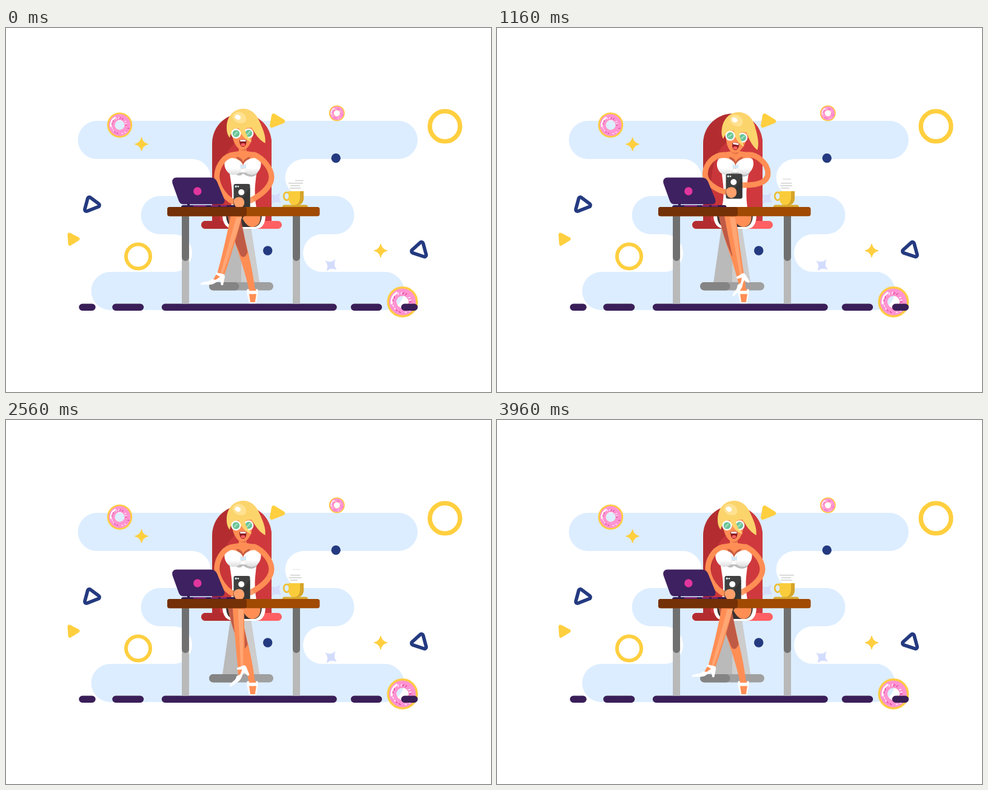
An HTML page that plays this animation: 800 px wide and 600 px high, repeating every 4000 ms.

```html
<!DOCTYPE html>
<html lang="en">
<head>
<meta charset="utf-8">
<title>Selfie at the desk</title>
<style>
html, body { margin: 0; width: 100%; height: 100%; overflow: hidden; background: #fff; }
svg { display: block; width: 100vw; height: 100vh; }
.skin { fill: #ff8e55; }
.arm { fill: none; stroke: #ff8e55; stroke-width: 9; stroke-linecap: round; }
.navy { fill: #243a80; }
.yellow { fill: #ffcf3f; }
.lavender { fill: #d3dcfd; }
.ring { fill: none; stroke: #ffcf3f; }
.round { stroke-linejoin: round; }
.outline { fill: #fff; stroke: #243a80; stroke-width: 11.4; paint-order: stroke; }
.steam line { stroke: #d6d6d6; stroke-width: 1.8; }
</style>
</head>
<body>
<svg viewBox="0 0 800 600">
  <defs>
    <path id="star" d="M0-11Q2-2 11 0Q2 2 0 11Q-2 2-11 0Q-2-2 0-11Z" stroke-width="1" class="round"/>
    <linearGradient id="cup" x2="0" y2="1">
      <stop offset=".6" stop-color="#fff"/><stop offset="1" stop-color="#dcdcdc"/>
    </linearGradient>
  </defs>

  <path fill="#dcedff" d="M150 153H647.500a31.500 31.500 0 0 1 0 63H491a30.500 30.500 0 0 0 0 61H543a31.500 31.500 0 0 1 0 63H521a31 31 0 0 0 0 62H625a31.500 31.500 0 0 1 0 63H172a31.500 31.500 0 0 1 0-63H276a31 31 0 0 0 0-62H254a31.500 31.500 0 0 1 0-63H307a30.500 30.500 0 0 0 0-61H150a31.500 31.500 0 0 1 0-63Z"/>

  <!-- floating ornaments -->
  <circle class="ring" cx="724" cy="162" r="24.900" stroke-width="7.400"/>
  <circle class="ring" cx="218" cy="376.500" r="20" stroke-width="6"/>
  <circle class="navy" cx="544.200" cy="214.500" r="7.700"/>
  <circle class="navy" cx="431.700" cy="367" r="7.700"/>
  <g class="outline round">
    <path d="M137.500 281.800L151.300 292L132.800 299.300Z"/>
    <path d="M685.300 355.800L690.300 374.200L671.700 368Z"/>
  </g>
  <g class="yellow round" stroke="#ffcf3f">
    <path stroke-width="6" d="M104.500 340.500L118.500 347.700L105.500 355.800Z"/>
    <path stroke-width="7" d="M441.500 144.500L456.500 153.800L438.500 160.800Z"/>
  </g>
  <use href="#star" class="yellow" stroke="#ffcf3f" x="223.500" y="191.500"/>
  <use href="#star" class="yellow" stroke="#ffcf3f" x="618" y="367"/>
  <use href="#star" class="lavender" stroke="#d3dcfd" transform="translate(536 391) rotate(38)"/>
  <use href="#star" class="lavender" stroke="#d3dcfd" transform="translate(445 281) rotate(38)"/>
  <g id="donuts"></g>

  <!-- floor -->
  <path stroke="#3a1e58" stroke-width="11.500" stroke-linecap="round" d="M126 460.300H142M181 460.300H221.500M262.500 460.300H540M574.500 460.300H614.500M657.500 460.300H673.500"/>

  <!-- chair -->
  <path fill="#b32d30" d="M340 320V190a49 49 0 0 1 98 0V320Z"/>
  <path fill="#cf393d" d="M389 141a49 49 0 0 1 49 49V320H389Z"/>
  <path fill="#c9363a" d="M389 185C365 190 353 225 353 262V318H389Z"/>
  <path fill="#bababa" d="M370 330H404L418 420H357Z"/>
  <path fill="#cdcdcd" d="M388 330H404L418 420H388Z"/>
  <rect x="335" y="419" width="106" height="13.500" rx="6.700" fill="#a0a0a0"/>
  <rect x="335" y="419" width="49.500" height="13.500" rx="6.700" fill="#848484"/>
  <rect x="322" y="318" width="133" height="13" rx="6.500" fill="#ff6063"/>
  <path fill="#b32d30" d="M390 318V331H328.500a6.500 6.500 0 0 1 0-13Z"/>

  <!-- skirt and legs -->
  <path fill="#fff" d="M357 308C357 323 364 331 377 331H412C423 331 428 322 428 308Z"/>
  <path fill="#3c3333" d="M363 308C363 321 368 328 379 328H408C417 328 422 320 422 308Z"/>
  <path class="skin" d="M394 308H419.500C421 322 414 328 406 328C398 327 394 321 390 314Z"/>
  <path class="skin" d="M366 308H386C391 344 405 380 411 433H401C393 390 370 340 366 308Z"/>
  <path fill="#bf5a45" d="M366 308H386L398.500 370Q393 382 387 375Q371 340 366 308Z"/>
  <path fill="#fff" d="M397.500 430.500H415.500V438L412.500 454H401L397.500 438Z"/>
  <path class="skin" d="M401 433L400.800 430H412.500L412 433ZM401 438.500H413L410.800 452H403Z"/>
  <path id="leg" class="skin"/>
  <path id="shin" fill="#ffa674"/>
  <g id="shoe">
    <path class="skin" d="M-6-2L5 0L4 8L-14 12Z"/>
    <path fill="#fff" d="M-33 15C-25 10-20 14-15 8L-8 9L-1 4L-8 0L-7-3L6 0L7 4L4 18H1L-1 10C-7 11-10 17-17 17H-31Q-34 17-33 15Z"/>
  </g>

  <!-- woman -->
  <g id="torso">
    <path class="skin" d="M384 193H397V203L411 205C417 208 418 216 415 234H366C363 216 364 208 371 205L384 203Z"/>
    <path fill="#fff" d="M368 232H414C412 255 408 265 413 296H371C376 270 370 252 368 232Z"/>
    <path fill="#bdbdbd" d="M377 238H415C411 248 399 246 391 240C387 245 380 244 377 238Z"/>
    <path fill="#c95d42" d="M380 212Q390 214 391 221Q394 214 403 212L397 227H385Z"/>
    <path fill="url(#cup)" d="M363 215.500C371 213 380 214 386 219Q391 223 391 229C389 238 382 242 375 242C364 242 356 225 363 215.500Z"/>
    <path fill="url(#cup)" d="M418 215.500C411 213 402 214 396 219Q391 223 391 229C393 238 399 242 406 242C417 242 425 225 418 215.500Z"/>
    <path fill="#d2e9f8" d="M386 224L391 227L396 224V232L391 231L387 233Z"/>
  </g>
  <path id="leftArm" class="arm"/>
  <path id="rightArm" class="arm"/>
  <circle id="fist" fill="#ffa06b"/>

  <g id="head">
    <path fill="#d96843" d="M384 194H397V201Q390 204 384 199Z"/>
    <path class="skin" d="M372 162H407C408 180 404 193 396 199Q390 203 384 199C376 192 372 181 372 162Z"/>
    <path fill="#8f1f27" d="M385 184.500Q391 182.500 396.500 184.500C397 191 395 196 391 196C387 196 385 191 385 184.500Z"/>
    <path fill="#fff" d="M386 184.500Q391 183.500 395.500 184.500V187H386.300Z"/>
    <ellipse cx="391" cy="192.500" rx="3.500" ry="2.500" fill="#ff625f"/>
    <path fill="#fcd46c" d="M364 164C364 145 376 133 392 133C407 134 415 145 419 156C425 169 429 180 427.500 190C417 184 410 173 405 164L396 165C398 175 401 181 405 188C394 184 387 175 384 165C377 165 371 171 369 181C365 176 364 170 364 164Z"/>
    <g fill="#6cc498" stroke="#fff" stroke-width="2.300">
      <path fill="none" d="M386 173Q390 170 394 173"/>
      <circle cx="379.500" cy="174" r="7"/>
      <circle cx="400.200" cy="173.700" r="7"/>
    </g>
    <path stroke="#a5e2bf" stroke-width="2" d="M376 177L382 171M397 177L403 170"/>
    <path fill="#fcd46c" d="M384 163L393 164C395 175 400 182 405 188C394 184 387 175 384 163Z"/>
    <path fill="#ffe190" d="M374 146C376 137 386 136 393 142C399 149 396 157 389 157C380 157 375 153 374 146Z"/>
    <ellipse cx="382.500" cy="147" rx="5" ry="4" fill="#fff" transform="rotate(25 382.500 147)"/>
  </g>

  <g id="phone">
    <rect x="375.500" y="257" width="27" height="41" rx="3" fill="#414141"/>
    <path fill="#353535" d="M402.500 263V295a3 3 0 0 1-3 3H379Z"/>
    <circle cx="388.200" cy="270.700" r="5" fill="#fff"/>
    <circle cx="379.300" cy="261.200" r="1.800" fill="#c7e4ef"/>
    <circle cx="383" cy="261.200" r="1.200" fill="#fff"/>
    <path fill="#ffa06b" d="M376 283C379 278 389 277 392 283C395 289 392 296 385 297C379 297 375 291 376 283Z"/>
  </g>

  <!-- desk -->
  <path fill="#b9b9b9" d="M290 308H302V454.500H290ZM473 308H485V454.500H473Z"/>
  <path fill="#707070" d="M290 308H302V378a6 6 0 0 1-12 0ZM473 308H485V378a6 6 0 0 1-12 0Z"/>
  <rect x="266" y="295" width="251.500" height="15.300" rx="4" fill="#a04a04"/>
  <rect x="266" y="295" width="131" height="15.300" rx="4" fill="#743006"/>

  <!-- laptop -->
  <path fill="#3e2160" d="M281 246.500H338Q345 246.500 348 253L360 282Q362 290.500 355 290.500H293Q287 290.500 285 285L274.500 256Q273 247 281 246.500Z"/>
  <path fill="#331a50" d="M299 289H303V292H375Q378.500 292 378.500 295H289Q289 292 293 292H299Z"/>
  <path stroke="#c62b95" stroke-width="1.300" d="M309 293.300H330M338 293.300H350M354 293.300H364"/>
  <circle cx="315.800" cy="269" r="6.700" fill="#e2369f"/>

  <!-- cup -->
  <ellipse cx="463" cy="277.300" rx="4.800" ry="6.500" fill="none" stroke="#ecbf36" stroke-width="2.800"/>
  <path fill="#facc3b" d="M466 269H491V280C491 288 486 292 481 292H475C470 292 466 288 466 280Z"/>
  <path fill="#d5a42b" d="M485 269H491V280C491 288 486 292 481 292H477C483 290 485 285 485 278Z"/>
  <path fill="#d9a92f" d="M459 291.500H495Q498 292 498 295H455.500Q456 292 459 291.500Z"/>
  <g class="steam"><line/><line/><line/><line/></g>
</svg>

<script>
const LOOP = 4000;
const byId = id => document.getElementById(id);
const set = (el, attrs) => { for (const k in attrs) el.setAttribute(k, attrs[k]); };
const mix = (a, b, k) => a + (b - a) * k;
const mixAll = (a, b, k) => a.map((v, i) => mix(v, b[i], k));
const clamp = v => Math.max(0, Math.min(1, v));

// Smooth curve through [time, value] pairs, flat at every peak.
function track(keys, t) {
  const slope = i => {
    const a = keys[i - 1], b = keys[i], c = keys[i + 1];
    if (!a || !c || (b[1] - a[1]) * (c[1] - b[1]) <= 0) return 0;
    return (c[1] - a[1]) / (c[0] - a[0]);
  };
  let i = 0;
  while (i < keys.length - 2 && t > keys[i + 1][0]) i++;
  const [t0, v0] = keys[i], [t1, v1] = keys[i + 1], d = t1 - t0;
  const s = clamp((t - t0) / d), s2 = s * s, s3 = s2 * s;
  return v0 + (v1 - v0) * (3 * s2 - 2 * s3)
    + d * (slope(i) * (s3 - 2 * s2 + s) + slope(i + 1) * (s3 - s2));
}

function donut(x, y, r) {
  const sprinkles = Array.from({ length: 16 }, (_, i) => {
    const a = i * 2.4, q = .5 + .26 * (i * .618 % 1);
    const turn = i * 67 % 180;
    return `<rect x="-.08" y="-.025" width=".16" height=".05" rx=".025"
      fill="${i % 2 ? '#fff' : '#d83a92'}"
      transform="translate(${q * Math.cos(a)} ${q * Math.sin(a)}) rotate(${turn})"/>`;
  }).join('');
  return `<g transform="translate(${x} ${y}) scale(${r})" fill="none">
    <circle r=".7" stroke="#ffcb43" stroke-width=".6"/>
    <circle r=".63" stroke="#ff93d2" stroke-width=".47"/>
    <path d="M-.7 .1A.7 .7 0 0 1-.38-.59" stroke="#fff" stroke-width=".13" stroke-linecap="round"/>
    ${sprinkles}</g>`;
}
byId('donuts').innerHTML = donut(187.5, 160, 20.7) + donut(545.8, 140.5, 13) + donut(654, 451.5, 25.5);

const TILT = [[0, 0], [600, 10.5], [1000, 10], [1600, 7], [2240, 3], [2560, 0],
  [2900, -8], [3300, -8], [3800, 0], [4000, 0]];
const LIFT = [[0, 0], [580, 15], [1600, 16], [2240, 10], [2560, 0], [4000, 0]];
const RAISE = [[0, 0], [2590, 0], [2830, 1], [3380, 1], [3720, 0], [4000, 0]];
const WAVE = [[0, 0], [2750, 6], [2960, 21], [3200, 0], [3370, 10], [3600, 0], [4000, 0]];

// Each arm: shoulder, two controls, elbow, two controls, hand.
const LEFT_REST = [370, 210, 357, 214, 347, 232, 348, 247, 349, 262, 362, 284, 382, 289];
const LEFT_UP = [371, 209, 358, 209, 343, 224, 343, 240, 343, 254, 362, 270, 384, 272];
const RIGHT_REST = [410, 209, 422, 214, 438, 230, 438, 246, 438, 258, 427, 272, 404, 284];
const RIGHT_UP = [410, 209, 428, 207, 447, 222, 447.5, 238, 447, 252, 436, 260, 404, 260];
const RIGHT_RAISED = [404, 209, 422, 217, 440, 220, 453, 212, 466, 203, 471, 188, 470, 174];

const armPath = p => `M${p.slice(0, 2)}C${p.slice(2, 8)}C${p.slice(8)}`;
const bend = (rest, up, elbow, hand) => rest.map((v, i) => mix(v, up[i], i < 8 ? elbow : hand));

function drawLeg(t) {
  const s = t % 2000 / 1000;
  const u = (1 - Math.cos(Math.PI * (s < 1 ? s ** .85 : s))) / 2;
  const x = 354 + 51 * u, y = 407 + 2 * u, top = 371 + 4 * u;
  set(byId('leg'), { d: `M${top} 308H${top + 19}Q${mix(top + 19, x + 6, .45)} 360 ${x + 6} ${y + 1}L${x - 6} ${y - 1}Q${mix(top, x - 6, .45)} 360 ${top} 308Z` });
  set(byId('shin'), { d: `M${top + 9} 312L${top + 18} 312Q${mix(top + 17, x + 3, .5)} 362 ${x + 3} ${y}L${x - 1} ${y}Z` });
  set(byId('shoe'), { transform: `translate(${x} ${y - 1}) rotate(${-46 * u ** .8})` });
}

function drawWoman(t) {
  const tilt = track(TILT, t), lift = track(LIFT, t), raise = track(RAISE, t);
  const lean = tilt / 270, shift = tilt * .3;
  const elbow = clamp(tilt / 10), hand = lift / 16;
  set(byId('torso'), { transform: `matrix(1 0 ${-lean} 1 ${295 * lean} 0)` });
  set(byId('head'), { transform: `translate(${Math.min(0, tilt) * .2} ${5.3 * elbow ** .6}) rotate(${tilt} 391 205)` });
  set(byId('phone'), { transform: `translate(${2 * hand} ${-lift})` });

  const left = bend(LEFT_REST, LEFT_UP, elbow, hand);
  const wave = track(WAVE, t);
  const raised = RIGHT_RAISED.map((v, i) => i % 2 ? v : v + wave * (i / 12) ** 2);
  const right = mixAll(bend(RIGHT_REST, RIGHT_UP, elbow, hand), raised, raise);
  left[0] += shift;
  right[0] += shift;
  set(byId('leftArm'), { d: armPath(left) });
  set(byId('rightArm'), { d: armPath(right) });
  set(byId('fist'), { cx: right[12] - 4.5 * raise, cy: right[13] - 4 * raise, r: 4.5 + 5.7 * raise });
}

const steam = document.querySelectorAll('.steam line');
function drawSteam(t) {
  const s = t / LOOP, swell = (1 - Math.cos(s * 2 * Math.PI)) / 2;
  const left = track([[0, 477], [1600, 470], [4000, 478]], t);
  const rows = [
    [left, left + 13.5, 251.5 - 8 * s, 1 - s],
    [466 + 4 * swell, 490 - 6 * swell, 255.8, 1],
    [469 - 3 * swell, 485 + 3 * swell, 260, 1],
    [468 + swell, 486 - 6 * swell, 264, 1]
  ];
  rows.forEach(([x1, x2, y, opacity], i) => set(steam[i], { x1, x2, y1: y, y2: y, opacity }));
}

function frame(now) {
  const t = now % LOOP;
  drawLeg(t);
  drawWoman(t);
  drawSteam(t);
  requestAnimationFrame(frame);
}
frame(0);
</script>
</body>
</html>
```
